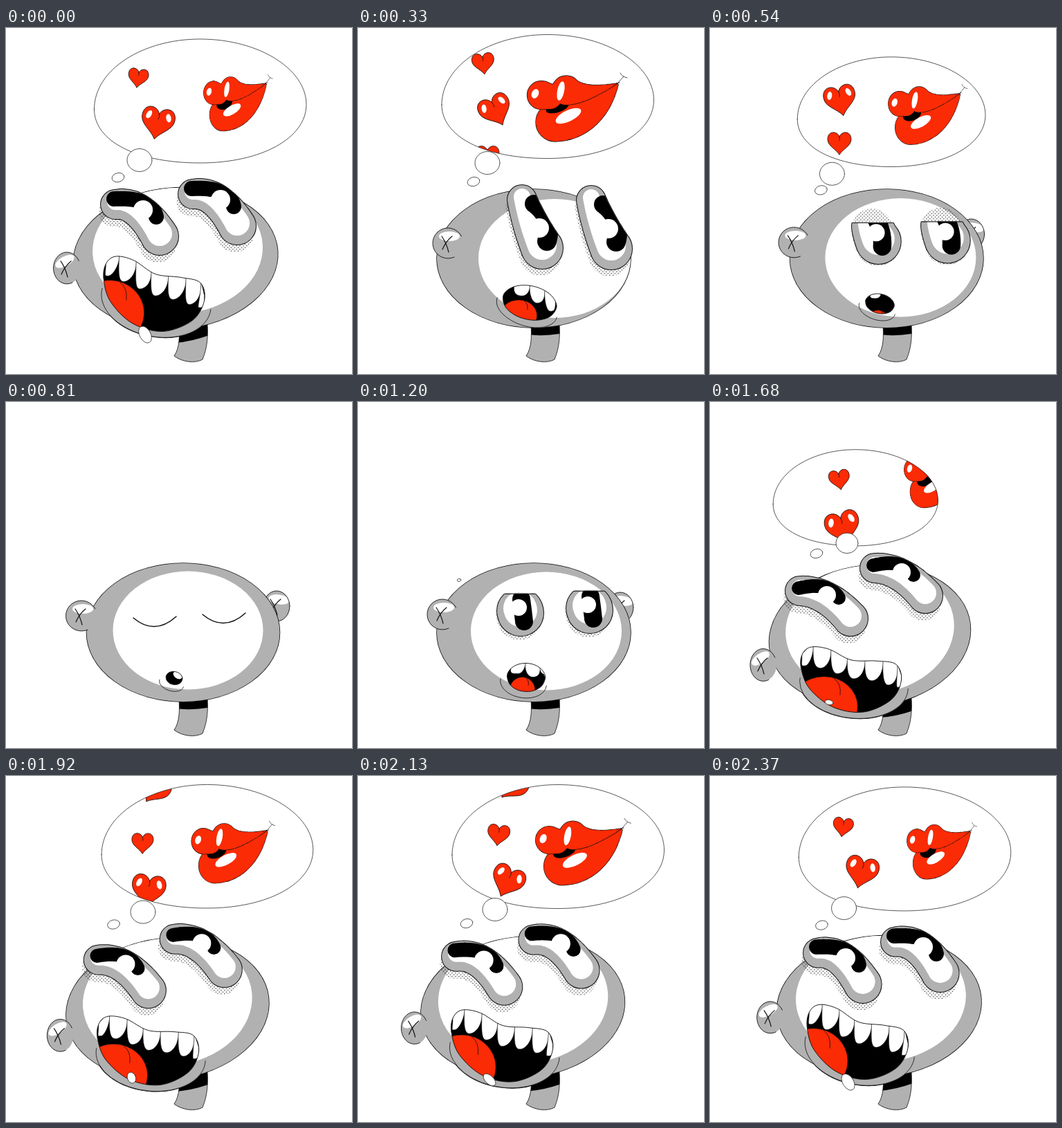
Animation of 500x500 px, one loop 2400 ms. Source, as an HTML page with a canvas:

```html
<!DOCTYPE html>
<html lang="en">
<head>
<meta charset="utf-8">
<title>Daydream</title>
<style>
  html, body { margin: 0; width: 100%; height: 100%; overflow: hidden; background: #fff; }
  canvas { display: block; }
</style>
</head>
<body>
<canvas id="stage" width="500" height="500"></canvas>
<script>
const LOOP = 2400, GRAY = '#b1b1b1', RED = '#fb2b05', INK = '#111';
const ctx = document.getElementById('stage').getContext('2d');

const lerp = (a, b, k) => a + (b - a) * k;
const clamp = v => Math.max(0, Math.min(1, v));

// Cyclic monotone cubic through keys [time, ...values]
function track(...keys) {
  const n = keys.length;
  const key = i => keys[(i + n) % n];
  const time = i => key(i)[0] + Math.floor(i / n) * LOOP;
  const slope = (i, c) => {
    const a = (key(i)[c] - key(i - 1)[c]) / (time(i) - time(i - 1));
    const b = (key(i + 1)[c] - key(i)[c]) / (time(i + 1) - time(i));
    return a * b > 0 ? 2 * a * b / (a + b) : 0;
  };
  return t => {
    let i = n - 1;
    while (i > 0 && keys[i][0] > t) i--;
    const h = time(i + 1) - time(i), u = (t - time(i)) / h;
    return key(i).slice(1).map((v, j) => lerp(v, key(i + 1)[j + 1], u * u * (3 - 2 * u))
      + h * u * (1 - u) * ((1 - u) * slope(i, j + 1) - u * slope(i + 1, j + 1)));
  };
}

// Size of a thought bubble: shrinks from a to b, swells from c to d
const swell = (t, a, b, c, d) => t < 1000
  ? 1 - clamp((t - a) / (b - a)) ** 2
  : 1 - (1 - clamp((t - c) / (d - c))) ** 2;

// Circles strung along a quadratic spine, radius going from r0 to r1
function blob([x0, y0, cx, cy, x1, y1, r0, r1], inset = 0, taper = 1) {
  const path = new Path2D();
  for (let u = 0; u <= 1; u += 1 / 32) {
    const x = lerp(lerp(x0, cx, u), lerp(cx, x1, u), u);
    const y = lerp(lerp(y0, cy, u), lerp(cy, y1, u), u);
    const r = Math.max(0, lerp(r0, r1, u ** taper) - inset);
    path.moveTo(x + r, y);
    path.arc(x, y, r, 0, 7);
  }
  return path;
}

// Smooth closed path through [x, y] points
function smooth(p) {
  const path = new Path2D(), at = i => p[(i + p.length) % p.length];
  path.moveTo(...p[0]);
  p.forEach((b, i) => {
    const a = at(i - 1), c = at(i + 1), d = at(i + 2);
    path.bezierCurveTo(b[0] + (c[0] - a[0]) / 6, b[1] + (c[1] - a[1]) / 6,
      c[0] - (d[0] - b[0]) / 6, c[1] - (d[1] - b[1]) / 6, ...c);
  });
  return path;
}

function oval(x, y, rx, ry, rot = 0, from = 0, to = 7) {
  const path = new Path2D();
  path.ellipse(x, y, Math.max(0, rx), Math.max(0, ry), rot, from, to);
  return path;
}

function paint(path, fill, width = 0) {
  if (fill) { ctx.fillStyle = fill; ctx.fill(path); }
  if (width) line(path, width);
}

function line(path, width, color = INK) {
  ctx.strokeStyle = color;
  ctx.lineWidth = width;
  ctx.stroke(path);
}

// Fill several shapes as one, with a common outline
function merge(fill, width, ...paths) {
  paths.forEach(p => line(p, 2 * width));
  paths.forEach(p => paint(p, fill));
}

function group(draw, x = 0, y = 0, rot = 0, sx = 1, sy = sx) {
  ctx.save();
  ctx.translate(x, y);
  ctx.rotate(rot);
  ctx.scale(sx, sy);
  draw();
  ctx.restore();
}

const tile = document.createElement('canvas');
tile.width = tile.height = 5;
const tc = tile.getContext('2d');
tc.fillStyle = INK;
for (const c of [1.25, 3.75]) tc.fill(oval(c, c, 0.7, 0.7));
const dots = ctx.createPattern(tile, 'repeat');

// Main poses: 0 gazing up, 330 surprised, 810 asleep, 1200 drowsy, 1680 thrown back
const skull = track([0,245,333,148,102,-.08], [330,254,333,140,100,0], [810,256,333,139.5,100,0],
  [1200,254,333,140,100,0], [1680,231,338,146,102,-.12]);
const face = track([0,248,320,123,93,-.05], [330,284,333,110,86,0], [810,263,330,108.5,85.5,0],
  [1200,272,331,109,85.5,0], [1680,231,328,122,94,-.1]);
const ear = track([0,88,347,19.5,23,-.5], [330,130,311,22,22,0], [810,109,309,22.5,22,0],
  [1200,122,307,22,22,0], [1680,77,380,19,23.5,-.6]);
const farEar = track([0,345,300], [330,362,300], [810,391,295], [1200,379,297], [1680,340,300]);
const collar = track([0,455,443], [330,443,441], [1200,443,441], [1680,456,445]);

// Spines with end radii
const eye = track([0,158,255,192,250,222,301,21,27], [330,237,248,248,284,266,318,21,30],
  [650,234,302,235,304,235,305,33,33], [1200,234,302,235,304,235,305,33,33],
  [1680,130,273,168,273,203,313,21,25]);
const pupil = track([0,156,247,211,244,217,273,11,11], [330,254,254,283,275,273,308,13,14],
  [650,236,285,238,300,240,317,13,13], [1200,236,285,238,300,240,317,13,13],
  [1680,128,269,172,259,186,283,10,10]);
const glint = track([0,198,263,14], [330,262,289,14], [650,232,297,12], [1200,232,297,12], [1680,169,279,13]);
const lid = track([0,200], [380,210], [680,335], [920,335], [1200,277], [1680,200]);
const shade = track([0,11], [330,10], [680,0], [930,0], [1200,6], [1680,11]);
const gap = track([0,112,-15], [330,100,1], [810,100,-5], [1200,100,-4], [1680,108,-33]);

// Mouth: centre, half size, tilt, how far it is torn open
const mouth = track([0,213,386,74,51,.09,1], [330,248,397,39.5,24.5,.22,0], [740,243,399,12,9.5,.2,0],
  [900,243,399,12,9.5,.2,0], [1200,243,398,27.5,20.5,.05,0], [1680,204,401,72.5,47,0,1]);
const tongue = track([0,-.85,.5], [330,-.4,.75], [740,0,2.2], [900,0,2.2], [1200,-.2,.9], [1680,-.54,.83]);
const teeth = track([0,.09,.133,7,32,-6], [330,.22,.23,3,21,0], [740,.16,.31,0,0,0],
  [900,.16,.31,0,0,0], [1200,.16,.31,2,16,0], [1680,.07,.14,7,28,-3]);
const drool = track([0,201,443,8,13,-.5], [110,208,460,7,12,-.2], [250,214,486,0,0,0],
  [1560,168,434,0,0,0], [1680,172,434,6,3.5,.2], [2130,190,439,6,11,-.8]);

const bubble = track([0,280.5,105.5], [330,274,99], [540,262,121], [720,190,205],
  [1380,190,215], [1680,210,138.5], [1950,293,101], [2130,289,102]);
const puff = track([0,193,191], [330,187,195], [760,165,230], [1230,155,245], [1680,198,204], [2130,198,193]);
const dot = track([0,162,216], [330,167,222], [790,150,250], [1160,146,258], [1680,154,219], [2130,157,213]);
const lips = track([0,1,0,0], [330,0,0,0], [560,.7,-15,15], [1680,1,-5,4], [2130,.15,6,-4]);
// Each heart: x, y, size, tilt
const hearts = [
  track([0,191,72,29,.14], [330,181,51,32,-.12], [560,174,32,32,-.1], [1400,180,132,30,-.2],
    [1680,187,112,30,-.15], [2130,203,85,32,.13]),
  track([0,219,137,48,.2], [330,199,119,47,-.45], [560,188,104,46,-.2], [1400,186,200,50,-.3],
    [1680,192,181,50,-.25], [2130,216,152,48,.42]),
  track([0,225,-40,44,.7], [1400,195,25,38,.2], [2130,222,14,44,.7]),
  track([0,185,215,34,0], [330,187,186,34,0], [560,187,166,34,0], [1400,185,300,34,0], [2130,185,245,34,0])
];

const heartPath = new Path2D('M0-.27C.09-.53 .5-.53 .5-.16C.5.13 .16.24 0 .5C-.16.24-.5.13-.5-.16C-.5-.53-.09-.53 0-.27Z');
const bubblePath = new Path2D('M-153 12C-153-46-82-89.5 0-89.5C85-89.5 153.5-46 153.5 5C153.5 54 88 89.5 0 89.5C-94 89.5-153 57-153 12Z');
const neckPath = new Path2D('M250 415H291V428C292 446 291 462 284 479C273 485 255 483 243 474C251 462 251 446 250 428Z');
const crossPath = new Path2D('M-9-10Q-2 0 1 13M6-10Q-3-3-8 9');
const lashPath = new Path2D('M184 312Q215 338 246 310');
// Shouting mouth in a unit box; the first eight points are the upper lip
const SHOUT = [[-1,-.36], [-.97,-.79], [-.79,-1], [-.44,-.93], [0,-.6], [.5,-.57],
  [.89,-.47], [1,.02], [.8,.62], [.25,1], [-.36,.85], [-.83,.28]];

function drawNeck(t) {
  const [l, r] = collar(t);
  paint(neckPath, GRAY);
  group(() => {
    ctx.clip(neckPath);
    paint(new Path2D(`M245 410H296V${r}Q270 ${(l + r) / 2 + 4} 245 ${l}Z`), '#000');
  });
  line(neckPath, 0.8);
}

function drawEar(x, y, rx, ry, tilt, from = 0, to = 7) {
  group(() => {
    paint(oval(0, 0, rx, ry), GRAY);
    group(() => paint(oval(2, -10, 15, 7), '#fff'), 0, 0, tilt);
    line(crossPath, 1.2);
    line(oval(0, 0, rx, ry, 0, from, to), 0.9);
  }, x, y);
}

function drawHead(t) {
  const [x, y, w, h, tilt, open] = mouth(t);
  const chin = [x - 4 + 8 * open, y + 8, w + 6, h + 1, tilt + .1];
  const top = oval(...skull(t)), jaw = oval(...chin, 0, Math.PI);
  merge(GRAY, 0.8, top, jaw);
  group(() => {
    ctx.clip(top);
    paint(oval(...face(t)), '#fff');
  });
  line(jaw0(chin), 0.8);
}

const jaw0 = chin => oval(...chin, -0.05, Math.PI + 0.05);

function drawEye(t, x, y) {
  const spine = eye(t), shape = blob(spine), [top] = lid(t), [d] = shade(t);
  group(() => {
    if (top > 322) return line(lashPath, 1.5);
    group(() => paint(shape, dots), -d / 4, d);
    const open = new Path2D();
    open.rect(0, top, 500, 500);
    ctx.clip(open);
    merge(GRAY, 1, shape);
    ctx.clip(shape);
    group(() => paint(blob(spine, 9), '#fff'), 0, -4);
    paint(blob(pupil(t)), '#000');
    const [gx, gy, r] = glint(t);
    paint(oval(gx, gy, r, r), '#fff');
    line(new Path2D(`M0 ${top}H500`), 2);
  }, x, y);
}

// Mouth outline: an oval that tears open into the shout
function mouthPoints([x, y, w, h, tilt, open]) {
  const cos = Math.cos(tilt), sin = Math.sin(tilt);
  return SHOUT.map(([sx, sy], i) => {
    const a = Math.PI * (i < 7 ? 1 + i / 7 : 2 + (i - 7) / 5);
    const px = w * lerp(Math.cos(a), sx, open), py = h * lerp(Math.sin(a), sy, open);
    return [x + px * cos - py * sin, y + px * sin + py * cos];
  });
}

// Point at share u of the upper lip's length
function along(p, u) {
  const seg = p.slice(0, 7).map((a, i) => Math.hypot(p[i + 1][0] - a[0], p[i + 1][1] - a[1]));
  let s = Math.min(1, u) * seg.reduce((a, b) => a + b), i = 0;
  while (i < 6 && s > seg[i]) s -= seg[i++];
  return p[i].map((v, c) => lerp(v, p[i + 1][c], s / seg[i]));
}

function drawTeeth(t, p) {
  const [start, step, count, len, lean] = teeth(t);
  for (let i = 0; i < count; i++) {
    const [ax, ay] = along(p, start + i * step);
    const [bx, by] = along(p, start + (i + 1) * step);
    const l = len * Math.min(1, count - i) * (i % 6 ? 1 : 0.65);
    const x = (ax + bx) / 2 + lean, y = (ay + by) / 2 + l, w = (bx - ax) * 0.3;
    paint(new Path2D(`M${ax} ${ay - 7}V${ay}C${ax - 1} ${ay + l * .7} ${x - w} ${y} ${x} ${y}` +
      `C${x + w} ${y} ${bx} ${by + l * .6} ${bx} ${by}V${by - 7}Z`), '#fff', 0.5);
  }
}

function drawMouth(t) {
  const pose = mouth(t), [x, y, w, h] = pose;
  const points = mouthPoints(pose), shape = smooth(points);
  group(() => {
    ctx.clip(shape);
    paint(shape, '#000');
    const [u, v] = tongue(t), tx = x + u * w, ty = y + v * h;
    paint(oval(tx, ty, w * .67, h * .92), RED, 0.6);
    line(new Path2D(`M${tx + w * .2} ${ty - h * .86}q${w * .15} ${h * .15} ${w * .12} ${h * .5}`), 0.8);
    drawTeeth(t, points);
    const shine = clamp((16 - w) / 4);
    paint(oval(x + 5, y - 4, 7 * shine, 4.5 * shine, 0.6), '#fff');
  });
  line(shape, 0.9);
  const [dx, dy, rx, ry, tilt] = drool(t);
  if (rx > 0.3) paint(oval(dx, dy, rx, ry, tilt), '#fff', 0.7);
}

function drawHeart(x, y, size, tilt) {
  group(() => {
    paint(heartPath, RED, 0.8 / size);
    line(new Path2D('M0-.27q.04 .08 0 .16'), 0.7 / size);
    if (size > 45) for (const side of [-1, 1])
      paint(oval(side * .3, -.2, .075, .13, -side * .35), '#fff');
  }, x, y, tilt, size);
}

// Open lips; puckering squeezes them towards the right corner
function drawLips(t) {
  const [pucker, x, y] = lips(t);
  group(() => {
    merge(RED, 0.7, blob([285,136, 335,135, 377,79, 28,0], 0, 2));
    paint(oval(288, 115, 17, 7 + 4 * pucker, -0.3), '#000');
    merge(RED, 0.7, blob([265,97, 270,98, 277,99, 20.5,18]), blob([301,90, 325,100, 377,79, 21,0]));
    paint(oval(256, 95, 5, 7, 0.4), '#fff');
    paint(oval(293, 91, 5, 14, 0.2), '#fff');
    paint(oval(304, 127, 20, 8, -0.45), '#fff');
    line(new Path2D('M375 80L384 70M379 65Q382 71 389 72'), 0.7);
  }, 377 + x - 377 * lerp(1, .69, pucker), 79 + y - 79 * lerp(1, .82, pucker),
  0, lerp(1, .69, pucker), lerp(1, .82, pucker));
}

function drawThought(t) {
  const [x, y] = bubble(t), s = swell(t, 450, 720, 1380, 1950);
  if (s > 0.01) {
    const shape = new Path2D();
    shape.addPath(bubblePath, new DOMMatrix([s, 0, 0, s, x, y]));
    group(() => {
      ctx.clip(shape);
      paint(shape, '#fff');
      hearts.forEach(h => drawHeart(...h(t)));
      drawLips(t);
    });
    line(shape, 0.7);
  }
  const p = swell(t, 560, 760, 1230, 1900), d = swell(t, 650, 790, 1160, 1400);
  if (p > 0.02) paint(oval(...puff(t), 18 * p, 16.5 * p), '#fff', 0.7);
  if (d > 0.02) paint(oval(...dot(t), 9 * d, 6.5 * d, -0.25), '#fff', 0.7);
}

function draw(t) {
  ctx.fillStyle = '#fff';
  ctx.fillRect(0, 0, 500, 500);
  ctx.lineCap = ctx.lineJoin = 'round';
  drawNeck(t);
  drawEar(...farEar(t), 19, 22, 0.15);
  drawHead(t);
  drawEar(...ear(t), 1.15, 5.8);
  drawMouth(t);
  drawEye(t, 0, 0);
  drawEye(t, ...gap(t));
  drawThought(t);
}

function tick() {
  draw(performance.now() % LOOP);
  requestAnimationFrame(tick);
}
tick();
</script>
</body>
</html>
```
